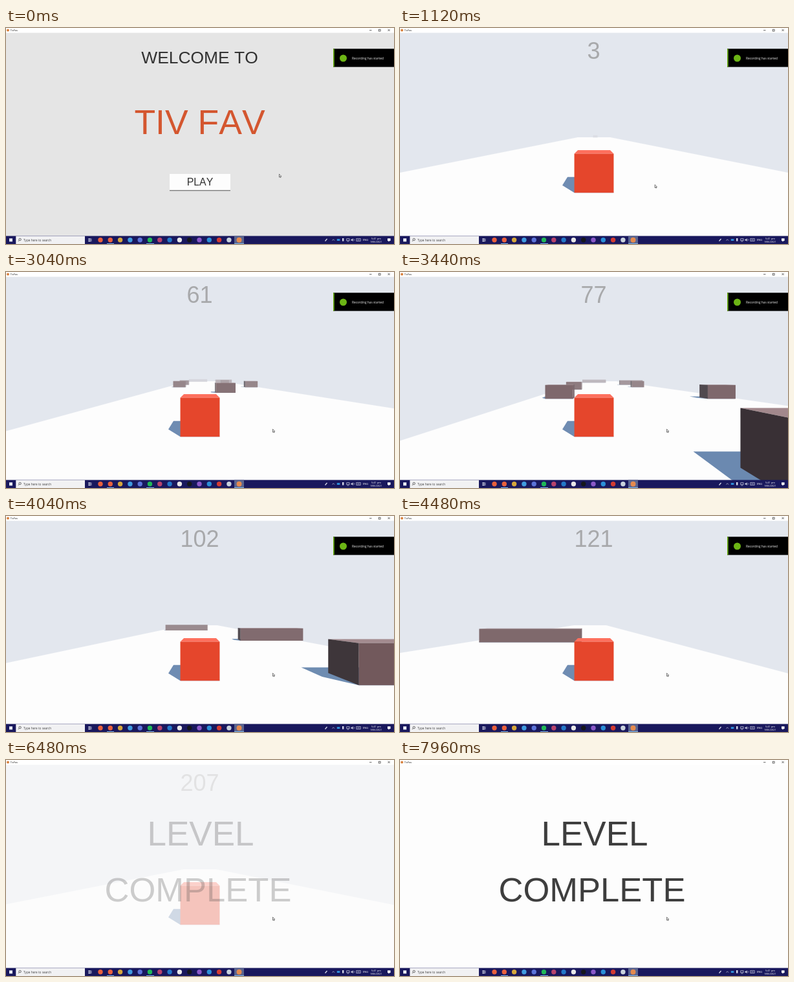
Write an HTML page with a canvas that moves like this. It is 600 px wide and 336 px high and loops after 8 s.

```html
<!DOCTYPE html>
<html lang="en">
<head>
<meta charset="utf-8">
<title>TivFav</title>
<style>
html, body { margin: 0; width: 100%; height: 100%; overflow: hidden; background: #fff; }
canvas { display: block; }
</style>
</head>
<body>
<canvas id="stage" width="600" height="336"></canvas>
<script>
const ctx = document.getElementById('stage').getContext('2d');
const LOOP = 8, START = 0.71, TOP_SPEED = 43.4;
const SKY = [227, 231, 238];
const ARIAL = '"Liberation Sans", Arial, sans-serif';
const UI = '"Open Sans", "Noto Sans", sans-serif';

// Camera: 5 units behind the player, 1.5 above the ground
const FOCAL = 274, HORIZON = 165, EYE = 1.5, FAR = 82, NEAR = 0.3, HALF_ROAD = 7.5;
const SUN = { dx: -0.42, dz: 0.65 };

// Left edge, front z, width
const obstacles = [
  [-6.6, 129.3, 7.5], [2.8, 111.9, 5], [3.3, 101.9, 2], [-6.5, 95.9, 2],
  [-6.4, 85.7, 2], [5.3, 85.7, 2], [-0.45, 74.9, 2]
];
const BRICK = { front: [108, 81, 84], side: [53, 44, 48], right: [104, 82, 86], top: [160, 134, 138] };
const RED = { front: [229, 61, 33], side: [150, 40, 26], right: [215, 64, 40], top: [255, 105, 86] };

const clamp = v => Math.max(0, Math.min(1, v));
const smooth = (t, a, b) => { const u = clamp((t - a) / (b - a)); return u * u * (3 - 2 * u); };
const fogged = (rgb, depth) =>
  `rgb(${rgb.map((c, i) => Math.round(c + (SKY[i] - c) * clamp(depth / FAR))).join()})`;

function rect(x, y, w, h, fill) { ctx.fillStyle = fill; ctx.fillRect(x, y, w, h); }
function disc(x, y, r, fill) {
  ctx.fillStyle = fill;
  ctx.beginPath(); ctx.arc(x, y, r, 0, 7); ctx.fill();
}
function poly(points, fill) {
  ctx.fillStyle = fill;
  ctx.beginPath();
  points.forEach(p => ctx.lineTo(p[0], p[1]));
  ctx.closePath(); ctx.fill();
}
function line(points, color, width = 0.7) {
  ctx.strokeStyle = color; ctx.lineWidth = width;
  ctx.beginPath();
  points.forEach(p => ctx.lineTo(p[0], p[1]));
  ctx.stroke();
}
function text(str, x, y, size, fill, align = 'center', family = ARIAL) {
  ctx.font = `${size}px ${family}`;
  ctx.textAlign = align;
  ctx.fillStyle = fill;
  ctx.fillText(str, x, y);
}

// Constant push against a drag of 1
function distance(t) {
  const s = Math.max(0, t - START);
  return TOP_SPEED * (s - 1 + Math.exp(-s));
}
const playerX = t => -2.9 * smooth(t, 2.4, 3.4) + 5.3 * smooth(t, 3.4, 4.75) - 2.35 * smooth(t, 5, 6.2);

// x relative to the camera, height above ground, depth from the camera
function project(x, height, depth) {
  const scale = FOCAL / Math.max(depth, NEAR);
  return [300 + x * scale, HORIZON + (EYE - height) * scale];
}

function shadow(x, depth, w) {
  const { dx, dz } = SUN, r = x + w, back = depth + 1;
  poly([[x, depth], [x + dx, depth + dz], [x + dx, back + dz], [r + dx, back + dz], [r, back], [r, depth]]
    .map(([px, d]) => project(px, 0, d)), fogged([104, 135, 174], depth));
}
function block(x, depth, w, paint) {
  const r = x + w, back = depth + 1;
  if (back < NEAR || depth > FAR) return;
  const face = (corners, color) => poly(corners.map(c => project(...c)), fogged(color, depth));
  face([[x, 1, depth], [x, 1, back], [r, 1, back], [r, 1, depth]], paint.top);
  if (x > 0) face([[x, 0, depth], [x, 1, depth], [x, 1, back], [x, 0, back]], paint.side);
  if (r < 0) face([[r, 0, depth], [r, 1, depth], [r, 1, back], [r, 0, back]], paint.right);
  if (depth > NEAR) face([[x, 0, depth], [x, 1, depth], [r, 1, depth], [r, 0, depth]], paint.front);
}

function drawGame(t) {
  const z = distance(t), px = playerX(t);
  rect(0, 7, 600, 317, `rgb(${SKY})`);
  const left = -HALF_ROAD - px, right = HALF_ROAD - px;
  poly([project(left, 0, FAR), project(right, 0, FAR), project(right, 0, 1), project(left, 0, 1)], '#fdfdfd');

  const items = obstacles.map(([x, oz, w]) => ({ x: x - px, depth: oz - z + 5, w, paint: BRICK }));
  items.push({ x: -0.5, depth: 4.5, w: 1, paint: RED });
  const shown = items.filter(o => o.depth > NEAR - 1 && o.depth < FAR).sort((a, b) => b.depth - a.depth);
  shown.forEach(o => shadow(o.x, o.depth, o.w));
  shown.forEach(o => block(o.x, o.depth, o.w, o.paint));
  text(Math.floor(z), 299.5, 48, 36, '#a8a9ab');

  const veil = smooth(t, 5.85, 6.85), words = smooth(t, 6.15, 7.15);
  rect(0, 7, 600, 317, `rgba(253,253,253,${veil})`);
  const ink = `rgba(62,62,62,${words})`;
  text('LEVEL', 301, 133, 53, ink);
  text('COMPLETE', 297, 220, 52.5, ink);
}

function drawMenu() {
  rect(0, 7, 600, 317, '#e5e5e5');
  text('WELCOME TO', 299.5, 55, 26.4, '#323232');
  text('TIV FAV', 299.5, 165, 53.5, '#d4562f');
  rect(253, 227, 94, 26.5, '#858585');
  rect(253, 227, 94, 25, '#fdfdfd');
  text('PLAY', 300, 245, 15.9, '#323232');
}

function drawToast(t) {
  ctx.save();
  ctx.translate(96 * smooth(t, 5.5, 5.8), 0);
  rect(506, 32.3, 94, 28.3, '#000');
  rect(506, 32.3, 1.8, 28.3, '#62a30c');
  disc(521.5, 47, 5.5, '#6cb515');
  text('Recording has started', 535, 48.8, 4.8, '#eee', 'left', UI);
  ctx.restore();
}

function drawTitleBar() {
  rect(0, 0, 600, 7.5, '#fff');
  disc(3, 3.5, 2, '#d8803c');
  text('TivFav', 6.7, 5, 4, '#222', 'left', UI);
  line([[562, 3.5], [565.5, 3.5]], '#333');
  ctx.strokeRect(576.3, 2.2, 2.8, 2.8);
  line([[590.5, 1.8], [593.7, 5]], '#333');
  line([[593.7, 1.8], [590.5, 5]], '#333');
}

const appColors = ['#e9603c', '#e9603c', '#d5a63c', '#3f9be0', '#5b73d8', '#1fb857', '#b8436c', '#2478c8',
  '#e8e8e8', '#15171c', '#8a58c8', '#2a8fd8', '#d23b32', '#c9d2dc'];

function drawTaskbar() {
  rect(0, 323.5, 600, 12.5, '#19185d');
  rect(5, 327.3, 5, 5, '#e8ecf6');
  rect(15.3, 323.7, 106.7, 12.3, '#f1f1f3');
  ctx.strokeStyle = '#333'; ctx.lineWidth = 0.7;
  ctx.beginPath(); ctx.arc(21.6, 329, 1.7, 0, 7); ctx.stroke();
  line([[20.4, 330.2], [18.8, 332]], '#333');
  text('Type here to search', 27, 331.7, 4.7, '#444', 'left', UI);
  rect(127.3, 327.5, 3.5, 1.8, '#d5d8e8');
  rect(127.3, 330.4, 3.5, 1.8, '#d5d8e8');
  rect(131.5, 327.5, 0.8, 4.7, '#d5d8e8');
  rect(353, 323.5, 15, 12.5, '#5a648f');
  appColors.forEach((color, i) => disc(146 + i * 15.3, 329.7, 3.7, color));
  disc(360.5, 329.7, 4, '#e58a4e');
  [[156, 11], [217, 12], [353, 15]].forEach(([x, w]) => rect(x, 335, w, 1, '#7fb4e6'));

  const pale = '#d5d8e8';
  line([[493.5, 331.5], [496.5, 328]], pale, 1.3);
  line([[504.5, 330.6], [506.3, 328.8], [508.1, 330.6]], pale);
  rect(511.8, 328.2, 4.5, 2.8, '#2f94e0');
  rect(520, 327, 2.4, 4.6, pale);
  ctx.strokeRect(526.8, 327.8, 4.2, 3);
  line([[527.5, 332], [530.3, 332]], pale);
  poly([[533.5, 328.8], [534.8, 328.8], [536.4, 327.2], [536.4, 332], [534.8, 330.5], [533.5, 330.5]], pale);
  line([[537.7, 328], [538.4, 329.6], [537.7, 331.2]], pale);
  ctx.strokeRect(541.8, 327.7, 6.4, 3.8);
  line([[543, 329.6], [547, 329.6]], pale);
  text('ENG', 556, 331.4, 4.2, '#fff', 'center', UI);
  text('5:41 pm', 572.5, 328.6, 4, '#fff', 'center', UI);
  text('9/06/2021', 572.5, 333.7, 3.8, '#fff', 'center', UI);
  rect(590, 327.3, 4.6, 3.8, '#fff');
  poly([[591, 331], [593, 331], [592, 332.6]], '#fff');
}

function drawCursor(t) {
  const reach = smooth(t, 0.05, 0.4), leave = smooth(t, 0.75, 1.3);
  const x = 422.5 - 84 * reach + 74 * leave;
  const y = 227.3 + 14 * reach + 3.2 * leave;
  const arrow = [[0, 0], [0, 4.8], [1.1, 3.8], [1.8, 5.4], [2.6, 5], [1.9, 3.5], [3.4, 3.4], [0, 0]]
    .map(([dx, dy]) => [x + dx, y + dy]);
  poly(arrow, '#fff');
  line(arrow, '#222', 0.6);
}

function frame(now) {
  const t = (now / 1000) % LOOP;
  ctx.fontKerning = 'none';
  if (t < START) drawMenu(); else drawGame(t);
  drawTitleBar();
  drawToast(t);
  drawTaskbar();
  drawCursor(t);
  requestAnimationFrame(frame);
}
requestAnimationFrame(frame);
</script>
</body>
</html>
```
